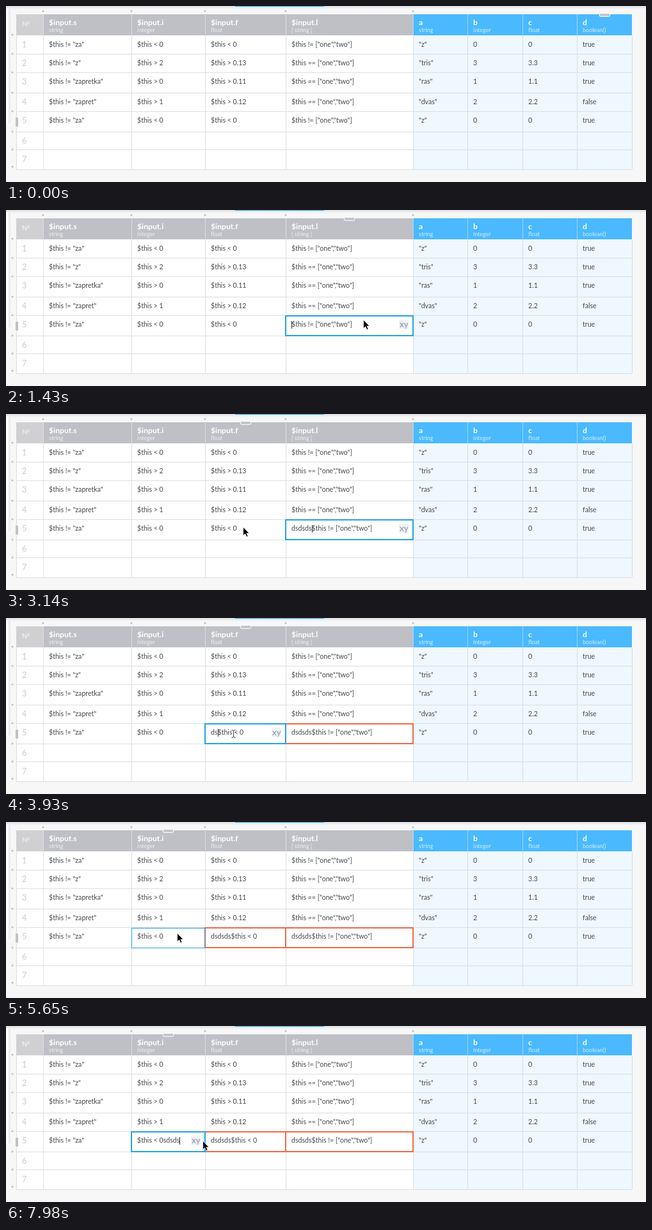
Recreate the animation shown at these times as an HTML page. Size 1000x276 px, loop 8000 ms.

```html
<!DOCTYPE html>
<html lang="en">
<head>
<meta charset="utf-8">
<title>Decision table editing</title>
<style>
html, body { margin: 0; width: 100%; height: 100%; overflow: hidden; background: #f7f7f8; }
svg { display: block; }
text { font: 10.6px Lato, "Open Sans", sans-serif; fill: #44484e; white-space: pre; }
.title { font-size: 12.2px; font-weight: 700; fill: #fff; }
.type { font-size: 9px; fill: #fff; opacity: .75; }
.num { font-size: 12.5px; fill: #c9cacd; }
.xy { font-size: 13px; font-weight: 700; fill: #9aa7b6; }
</style>
</head>
<body>
<svg id="stage" width="1000" height="276" viewBox="0 0 1000 276">
  <defs>
    <linearGradient id="top" x2="0" y2="1"><stop stop-color="#dcdfe2"/><stop offset="1" stop-color="#f7f7f8"/></linearGradient>
    <linearGradient id="side"><stop stop-color="#fff"/><stop offset=".4" stop-color="#fafafa"/><stop offset=".5" stop-color="#e9eaec"/><stop offset="1" stop-color="#f7f7f8"/></linearGradient>
  </defs>
  <rect width="1000" height="5" fill="url(#top)"/>
  <rect y="4" width="9" height="180" fill="url(#side)"/>
  <rect x="358" width="139" height="1" fill="#25a8ec"/>
</svg>
<script>
const LOOP = 8000;
const cols = [16, 58, 196, 311, 437, 636, 721, 807, 892, 978];
const rows = [13, 46, 75, 104, 136, 165, 197, 225, 256];
const baselines = [64, 93, 122, 154, 183, 215, 244];
const heads = [
  ["$input.s", "string"], ["$input.i", "integer"], ["$input.f", "float"], ["$input.l", "[ string ]"],
  ["a", "string"], ["b", "integer"], ["c", "float"], ["d", "boolean()"]
];
const data = [
  ['$this != "za"', "$this < 0", "$this < 0", '$this != ["one","two"]', '"z"', "0", "0", "true"],
  ['$this != "z"', "$this > 2", "$this > 0.13", '$this == ["one","two"]', '"tris"', "3", "3.3", "true"],
  ['$this != "zapretka"', "$this > 0", "$this > 0.11", '$this == ["one","two"]', '"ras"', "1", "1.1", "true"],
  ['$this != "zapret"', "$this > 1", "$this > 0.12", '$this == ["one","two"]', '"dvas"', "2", "2.2", "false"],
  ['$this != "za"', "$this < 0", "$this < 0", '$this != ["one","two"]', '"z"', "0", "0", "true"]
];
// Each edit: column, text inserted at an index, and its key moments in ms
const edits = [
  { col: 4, at: 0, typed: "dsdsds", select: 1050, open: 1180, type: 2070, close: 3450 },
  { col: 3, at: 0, typed: "dsdsds", select: 3450, open: 3650, type: 3790, close: 5520 },
  { col: 2, at: 9, typed: "sdsds", select: 5520, open: 6380, type: 7000, close: LOOP }
];
const KEY = 130;
const path = [
  [480, 988, 205], [1040, 558, 172], [2950, 558, 172], [3120, 370, 177], [3200, 370, 177],
  [3500, 355, 181], [4700, 355, 181], [5420, 267, 174], [5700, 267, 174],
  [6290, 272, 181], [7640, 272, 181], [7940, 307, 180]
];

const stage = document.getElementById("stage");
function set(el, attrs) {
  for (const k in attrs) el.setAttribute(k, attrs[k]);
}
function add(tag, attrs, parent = stage) {
  const el = document.createElementNS("http://www.w3.org/2000/svg", tag);
  set(el, attrs);
  return parent.appendChild(el);
}
function box(x, y, width, height, fill, more) {
  return add("rect", { x, y, width, height, fill, ...more });
}
function label(str, x, y, cls = "", parent = stage) {
  const el = add("text", { x, y, class: cls }, parent);
  el.textContent = str;
  return el;
}
function show(el, on) {
  el.style.display = on ? "" : "none";
}

// Table
box(16, 13, 620, 243, "#fff");
box(636, 13, 342, 243, "#eff7ff");
box(16, 13, 42, 33, "#d0d0d3");
box(58, 13, 578, 33, "#bfc0c5");
box(636, 13, 342, 33, "#4ab9fe");
for (const y of rows.slice(2)) {
  box(16, y, 620, 1, "#dedee0");
  box(636, y, 342, 1, "#d5dfe8");
}
cols.forEach((x, i) => {
  box(x, 46, 1, 210, i < 6 ? "#dedee0" : "#d5dfe8");
  if (i && i < 9) box(x, 13, 1, 33, "#fff", { opacity: .45 });
});
for (const x of cols.slice(1, 6)) add("circle", { cx: x, cy: 8, r: 1.6, fill: "#bfc1c5" });
for (const y of [45, 75, 104, 136, 165, 197, 225, 252]) add("circle", { cx: 10, cy: y, r: 1.6, fill: "#bfc1c5" });
box(15, 175, 4, 14, "#bfc1c5", { rx: 1 });

label("№", 25, 32, "type").style.fontSize = "11px";
heads.forEach(([name, type], i) => {
  label(name, cols[i + 1] + 9, 30, "title");
  label(type, cols[i + 1] + 9, 41, "type");
});
baselines.forEach((y, i) => label(i + 1, 25, y + 1, "num"));
const cells = data.map((row, r) => row.map((str, c) => label(str, cols[c + 1] + 9, baselines[r])));

// Moving parts
const handle = box(0, 11.5, 16, 5, "#c3c5ca", { rx: 1, stroke: "#fff" });
for (const e of edits) {
  e.cell = cells[4][e.col - 1];
  e.base = e.cell.textContent;
  const x = cols[e.col];
  e.frame = box(x, 166, cols[e.col + 1] - x, 31, "none");
}
const icon = add("g", {});
add("rect", { x: -1, y: 172, width: 15, height: 15, fill: "#f1f3f6" }, icon);
label("xy", 0, 184, "xy", icon);
const caret = box(0, 174, 1, 12, "#333");
const arrow = add("path", { d: "M.7 .5V13.5L3.7 10.7L5.9 15.6L8 14.7L5.9 9.9H9.8Z", fill: "#000", stroke: "#fff", "stroke-width": .6 });
const beam = add("path", { d: "M-3-6Q0-6 0-4Q0-6 3-6M0-4V4M-3 6Q0 6 0 4Q0 6 3 6", fill: "none", stroke: "#444" });

function pointer(t) {
  const i = path.findIndex(p => p[0] > t);
  if (i < 1) return path.at(i).slice(1);
  const [t0, x0, y0] = path[i - 1], [t1, x1, y1] = path[i];
  const u = (t - t0) / (t1 - t0), k = u * u * (3 - 2 * u);
  return [x0 + (x1 - x0) * k, y0 + (y1 - y0) * k];
}

function drawEdit(e, t) {
  const n = Math.max(0, Math.min(e.typed.length, Math.floor((t - e.type) / KEY) + 1));
  const str = e.base.slice(0, e.at) + e.typed.slice(0, n) + e.base.slice(e.at);
  if (e.cell.textContent !== str) e.cell.textContent = str;
  const thin = t < e.open;
  show(e.frame, t >= e.select);
  set(e.frame, {
    stroke: t < e.close ? "#23a2e6" : "#ef6848",
    "stroke-width": thin ? 1 : 2,
    transform: thin ? "translate(.5 .5)" : ""
  });
  if (t >= e.select && t < e.close) stage.insertBefore(e.frame, icon);
  e.pos = e.at + n;
  e.last = n ? e.type + (n - 1) * KEY : e.open;
}

function draw(t) {
  for (const e of edits) drawEdit(e, t);
  const active = edits.find(e => t >= e.open && t < e.close);
  show(icon, active);
  show(caret, active && (t - active.last) % 1060 < 530);
  if (active) {
    set(icon, { transform: `translate(${cols[active.col + 1] - 21} 0)` });
    const w = active.pos ? active.cell.getSubStringLength(0, active.pos) : 0;
    set(caret, { x: Math.round(cols[active.col] + 9 + w) });
  }

  const [x, y] = pointer(t), inside = t >= path[0][0];
  const col = inside ? Math.min(8, cols.findLastIndex(c => c <= x)) : 8;
  set(handle, { x: Math.floor((cols[col] + cols[col + 1]) / 2) - 7.5 });

  // The I-beam shows over the left part of an open cell, near its text
  const overText = active && col === active.col && x - cols[col] < 95;
  show(arrow, inside && !overText);
  show(beam, inside && overText);
  set(arrow, { transform: `translate(${x} ${y})` });
  set(beam, { transform: `translate(${Math.round(x) + .5} ${Math.round(y) + .5})` });
}

const start = performance.now();
function tick() {
  draw((performance.now() - start) % LOOP);
  requestAnimationFrame(tick);
}
tick();
</script>
</body>
</html>
```
